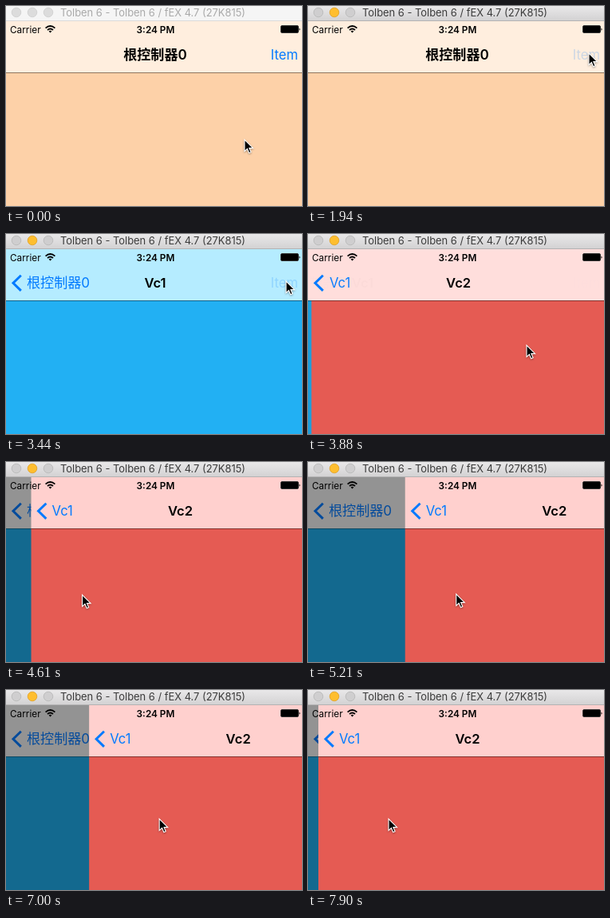
An HTML page for the animation above (8 s loop, 371 px wide and 250 px high).

```html
<!DOCTYPE html>
<html lang="en">
<head>
<meta charset="utf-8">
<title>Navigation controller with pan-to-go-back</title>
<style>
  html, body { margin: 0; width: 100%; height: 100%; overflow: hidden; }
  svg { display: block; width: 100%; height: 100%; }
  text { font-family: Inter, "Noto Sans CJK SC", "Noto Sans CJK", sans-serif; white-space: pre; }
  .status { font-size: 11.8px; }
  .title { font-size: 16.6px; font-weight: 600; text-anchor: middle; }
  .link { font-size: 16.6px; fill: #007aff; }
  .wide { font-size: 17.1px; }
  .chevron { fill: none; stroke: #007aff; stroke-width: 3; }
  .snapshot .link { fill: #044b9c; }
  .snapshot .chevron { stroke: #044b9c; }
  .caption { font-size: 12.9px; }
</style>
</head>
<body>
<svg viewBox="0 0 371 250">
  <defs>
    <linearGradient id="chrome" x2="0" y2="1">
      <stop stop-color="#e9e8e9"/><stop offset="1" stop-color="#d2d1d2"/>
    </linearGradient>
    <linearGradient id="bleed">
      <stop stop-color="#dfdfda"/><stop offset="1" stop-color="#dfdfda" stop-opacity="0"/>
    </linearGradient>
    <path id="back" d="M18.8 51.7 9 61.3 18.8 70.9"/>
  </defs>

  <rect id="under" y="19" width="371" height="231"/>
  <rect id="shade" y="19" width="371" height="231" opacity=".1"/>
  <g id="snapshot" class="snapshot">
    <rect y="83" width="371" height="167" fill="#13698f"/>
    <rect y="19" width="371" height="64" fill="#939393"/>
    <rect y="83" width="371" height="1" opacity=".3"/>
    <use href="#back" class="chevron"/>
    <text x="26" y="67" class="link wide">根控制器0</text>
  </g>

  <g id="front">
    <rect id="page" y="83" width="371" height="167"/>
    <rect id="bar" y="19" width="371" height="64"/>
    <rect id="edge" y="19" width="40" height="64" fill="url(#bleed)"/>
    <rect y="83" width="371" height="1" opacity=".44"/>
    <use id="chevron" href="#back" class="chevron"/>
    <text id="title0" x="187" y="67" class="title wide">根控制器0</text>
    <text id="title1" x="187" y="67" class="title">Vc1</text>
    <text id="title2" x="187" y="67" class="title">Vc2</text>
    <text id="back1" x="26" y="67" class="link wide">根控制器0</text>
    <text id="back2" x="26" y="67" class="link">Vc1</text>
    <text id="item" x="366" y="67" class="link" text-anchor="end">Item</text>
  </g>

  <text x="5" y="33.6" class="status">Carrier</text>
  <g fill="none" stroke="#000" stroke-width="1.8">
    <path d="M49.6 27.6Q55.5 22.3 61.4 27.6M52 30Q55.5 27 59 30"/>
    <path d="M53.6 31.4Q55.5 30 57.4 31.4L55.5 33.4Z" fill="#000" stroke="none"/>
  </g>
  <text x="187.5" y="33.6" class="status" font-weight="600" text-anchor="middle">3:24 PM</text>
  <rect x="344.5" y="24.5" width="22" height="9" rx="1.5" stroke="#333"/>
  <path d="M367.5 27.4Q369.6 29 367.5 30.8Z"/>

  <g fill="#dcdcdc" stroke="#cfcfcf" stroke-width=".8">
    <rect width="371" height="19" fill="#f5f5f5" stroke="none"/>
    <rect y="18" width="371" height="1" fill="#dadada" stroke="none"/>
    <circle cx="13" cy="8" r="5.8"/><circle cx="33" cy="8" r="5.8"/><circle cx="53" cy="8" r="5.8"/>
  </g>
  <g id="active">
    <rect width="371" height="19" fill="url(#chrome)"/>
    <rect y="18" width="371" height="1" fill="#b3b2b3"/>
    <g fill="#cfcecf" stroke="#b7b6b7" stroke-width=".8">
      <circle cx="13" cy="8" r="5.8"/>
      <circle cx="33" cy="8" r="5.8" fill="#ffbe2f" stroke="#e0a025"/>
      <circle cx="53" cy="8" r="5.8"/>
    </g>
  </g>
  <text id="caption" x="68" y="13" class="caption">Tolben 6 - Tolben 6 / fEX 4.7 (27K815)</text>

  <path id="cursor" d="M0 0V14.6L3.4 11.5 5.7 16.8 8.1 15.8 5.9 10.6H10.6Z"
        stroke="#fff" stroke-width="1.1" style="filter:drop-shadow(0 1px 1px rgba(0,0,0,.35))"/>
</svg>

<script>
const LOOP = 8000, FIRST_STEP = 1350, STEP = 148.8, WIDTH = 371;
const SPRING = 0.0183; // spring frequency per ms
const pushes = [1965, 3527];
const screens = [
  { page: '#fdd1a8', bar: '#ffeede' },
  { page: '#22b0f3', bar: '#b5ecff' },
  { page: '#e55b53', bar: '#ffd0ce', arriving: '#ffdedc' },
];
const drags = [
  { from: 4320, to: 6105, grab: 64 },
  { from: 6710, to: 7250, grab: 88 },
  { from: 7750, to: LOOP, grab: 88 },
];
// Turning points of the pointer: time, x, y.
const stops = [
  [1300, 299, 167], [1790, 352, 59], [3560, 351, 59], [3880, 274, 139],
  [4320, 64, 166], [4760, 175, 166], [5110, 175, 165], [5510, 234, 165],
  [5660, 212, 165], [6110, 212, 165], [6710, 88, 161], [7150, 228, 161],
  [7250, 228, 161], [7750, 88, 161], [7890, 101, 161],
];

const $ = id => document.getElementById(id);
const clamp = v => Math.min(1, Math.max(0, v));
const smooth = u => u * u * (3 - 2 * u);

function place(id, dx, opacity = 1) {
  $(id).style.transform = `translate(${dx}px)`;
  $(id).style.opacity = opacity;
}

function pointerAt(t) {
  const next = Math.max(1, stops.findIndex(stop => stop[0] > t));
  const [a, b] = t >= stops.at(-1)[0] ? [stops.at(-1), stops.at(-1)] : [stops[next - 1], stops[next]];
  const u = smooth(clamp((t - a[0]) / (b[0] - a[0] || 1)));
  return { x: a[1] + (b[1] - a[1]) * u, y: a[2] + (b[2] - a[2]) * u };
}

// Share of a push still to travel: a critically damped spring.
function remaining(elapsed) {
  const x = SPRING * elapsed;
  return (1 + x) * Math.exp(-x);
}

function draw(t) {
  const pointer = pointerAt(t);
  const depth = pushes.filter(start => t >= start).length;
  const rest = depth ? remaining(t - pushes[depth - 1]) : 0;
  const settled = clamp((0.06 - rest) / 0.05);
  const drag = drags.find(d => t >= d.from && t < d.to);
  const pan = drag ? Math.max(0, pointer.x - drag.grab) : 0;
  const { page, bar, arriving = bar } = screens[depth];

  $('cursor').style.transform = `translate(${pointer.x}px, ${pointer.y}px)`;
  place('front', pan);
  place('snapshot', 0, pan > 0 ? 1 : 0);
  place('page', rest * WIDTH);
  $('page').style.fill = page;
  $('bar').style.fill = rest > 0.004 ? arriving : bar;
  $('under').style.fill = screens[Math.max(0, depth - 1)].page;
  $('edge').style.transform = `scaleX(${1 + 8 * rest})`;
  $('edge').style.opacity = depth === 1 ? clamp(rest * 20) : 0;

  for (let i = 0; i < screens.length; i++) {
    const incoming = i === depth, outgoing = i === depth - 1;
    place('title' + i, incoming ? 135 * rest : -120 * (1 - rest),
          incoming ? 1 - rest : outgoing ? rest : 0);
    if (i) place('back' + i, incoming ? 80 * rest : -60 * (1 - rest),
                 incoming ? settled : outgoing ? rest : 0);
  }
  place('chevron', 0, [0, settled, 1][depth]);

  const pressed = pushes.some(start => t < start && t > start - 120);
  place('item', 0, pressed ? 0.2 : depth < 2 ? 1 : rest * 0.3);

  const focused = t >= 1790;
  $('active').style.opacity = focused ? 1 : 0;
  $('caption').style.fill = focused ? '#3b3b3b' : '#a9a9a9';
}

const begin = performance.now();
function tick() {
  const t = (performance.now() - begin) % LOOP;
  const step = Math.floor((t - FIRST_STEP + 10) / STEP);
  draw(FIRST_STEP + step * STEP);
  requestAnimationFrame(tick);
}
tick();
</script>
</body>
</html>
```
